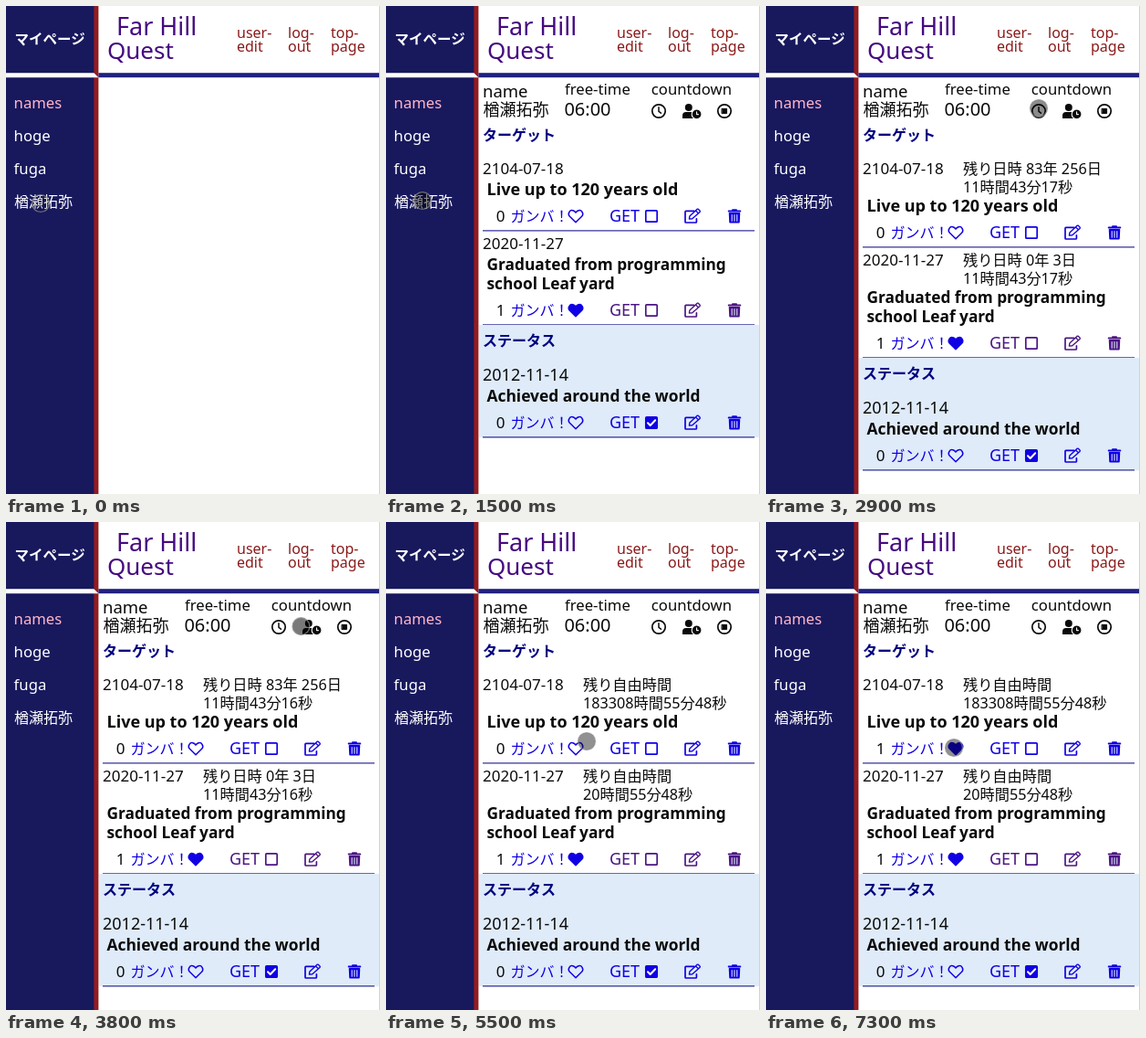
An HTML page for the animation above (7400 ms loop, 410 by 534 pixels).

```html
<!DOCTYPE html>
<html lang="ja">
<head>
<meta charset="utf-8">
<title>Goal list</title>
<style>
html, body { margin: 0; width: 100%; height: 100%; overflow: hidden; background: #fff; }
svg { display: block; width: 410px; height: 534px; }
text { font-family: "Noto Sans", "Noto Sans CJK JP", "Noto Sans CJK", sans-serif; white-space: pre; }
</style>
</head>
<body>
<svg id="stage" viewBox="0 0 410 534" xmlns="http://www.w3.org/2000/svg"></svg>
<script>
const LOOP = 7400, STEP = 100;
const SHOW_PAGE = 1300, SHOW_LEFT = 2700, TICK = 3700, SHOW_FREE = 4300, LIKE = 6400;
const BLUE = '#1000e4', PURPLE = '#4b1583', NAVY = '#000080', BLACK = '#0a0a0a', WINE = '#8b1a1a';
const PERSON = '楢瀬拓弥';
const stage = document.getElementById('stage');

const text = (x, y, size, fill, str, weight = 400) =>
  `<text x="${x}" y="${y}" font-size="${size}" fill="${fill}" font-weight="${weight}">${str}</text>`;
const rect = (x, y, w, h, fill) =>
  `<rect x="${x}" y="${y}" width="${w}" height="${h}" fill="${fill}"/>`;
const at = (x, y, color, body) =>
  `<g transform="translate(${x} ${y})" fill="none" stroke="${color}" stroke-width="1.7" stroke-linecap="round" stroke-linejoin="round">${body}</g>`;

const HEART = 'M0 6.8L-6.6 .3C-9.4-2.7-6.4-8-2.4-6C-1.2-5.4-.6-4.6 0-4C.6-4.6 1.2-5.4 2.4-6C6.4-8 9.4-2.7 6.6 .3Z';

function heart(x, y, full) {
  return at(x, y, BLUE, `<path d="${HEART}" fill="${full ? BLUE : 'none'}" stroke-width="1.5"/>`);
}

function box(x, y, color, checked) {
  const tick = checked ? '<path d="M-4 .2L-1.3 3L4.2-2.8" stroke="#fff" stroke-width="2"/>' : '';
  return at(x, y, color,
    `<rect x="-6.2" y="-6.2" width="12.4" height="12.4" rx="1" fill="${checked ? color : 'none'}"/>${tick}`);
}

function pencil(x, y, color) {
  return at(x, y, color,
    '<path d="M1.6-5.6H-7.2Q-8-5.6-8-4.8V6.2Q-8 7-7.2 7H3.6Q4.4 7 4.4 6.2V2.8"/>' +
    '<path d="M-3.6 3L-3.1 0L4.9-7.6Q5.7-8.2 6.5-7.6L8-6.1Q8.7-5.3 8-4.6L-.2 2.7ZM3.4-6.1L6.5-3.2" stroke-width="1.4"/>');
}

function trash(x, y, color) {
  return at(x, y, color,
    '<path d="M-6.3-5.6H6.3M-2-6.7H2" stroke-width="2"/>' +
    `<path d="M-5.4-3.2H5.4L4.9 6.7H-4.9Z" fill="${color}"/>` +
    '<path d="M-2.8-1.4V5.2M0-1.4V5.2M2.8-1.4V5.2" stroke="#dce2fa" stroke-width="1.1"/>');
}

function controls() {
  const clock = '<circle r="7.2"/><path d="M0-4.2V.4L2.4 2.2" stroke-width="1.5"/>';
  const user = `<g fill="${BLACK}" stroke="none"><circle cx="-3.2" cy="-4" r="4"/>` +
    '<path d="M-10 8V5Q-10 1-6 1H0Q3 1 4 3V8Z"/></g>' +
    `<circle cx="5.6" cy="3.4" r="5.4" fill="${BLACK}" stroke="#fff" stroke-width="1.1"/>` +
    '<path d="M5.6 .8V3.6H7.4" stroke="#fff" stroke-width="1.1"/>';
  const stop = `<circle r="7.2"/><rect x="-2.6" y="-2.6" width="5.2" height="5.2" fill="${BLACK}" stroke-width="1"/>`;
  return at(299, 115, BLACK, clock) + at(335, 115, BLACK, user) + at(371, 115, BLACK, stop);
}

function frameParts() {
  const nav = [['user-', 'edit', 253], ['log-', 'out', 309], ['top-', 'page', 356]];
  return rect(0, 0, 410, 534, '#fff') +
    rect(0, 0, 97, 534, '#18185d') + rect(96.4, 0, 5, 534, '#931c20') +
    '<path d="M0 73.2H96.4L101.4 78.2H0Z" fill="#fff"/>' +
    rect(101.4, 73.2, 307.6, 5, '#202080') + rect(409, 0, 1, 534, '#d2d2d2') +
    text(9.5, 42, 15.5, '#fff', 'マイページ', 700) +
    text(121, 32, 27, '#460b80', 'Far Hill') + text(111, 58, 26, '#460b80', 'Quest') +
    nav.map(([a, b, x]) => text(x, 35, 16, WINE, a) + text(x, 49.5, 16, WINE, b)).join('') +
    text(8.6, 112.2, 16.7, '#ffb6c8', 'names') + text(8.6, 148.2, 16.7, '#fff', 'hoge') +
    text(8.6, 184.2, 16.7, '#fff', 'fuga') + text(9, 220, 16, '#fff', PERSON);
}

function profile() {
  return text(106, 100, 18.5, BLACK, 'name') + text(106.5, 120, 18, BLACK, PERSON) +
    text(196, 97, 16.7, BLACK, 'free-time') + text(195.4, 120, 20, BLACK, '06:00') +
    text(290.8, 97, 16.7, BLACK, 'countdown') + controls() +
    text(106, 146.5, 16, NAVY, 'ターゲット', 700);
}

// One goal; y is the baseline of its date, gap the room for a second time line.
function goal(y, gap, g) {
  const last = y + 23 + gap + (g.lines.length - 1) * 21;
  const mid = last + 23, color = g.color;
  return text(106, y, g.done ? 18 : 17, BLACK, g.date) +
    (g.left || []).map((s, i) => text(216, y + i * 20, 16.2, BLACK, s)).join('') +
    g.lines.map((s, i) => text(110.5, y + 23 + gap + i * 21, g.size, BLACK, s, 700)).join('') +
    text(120.8, mid + 5.5, 17, BLACK, g.likes) + text(136.4, mid + 5.5, 16, BLUE, 'ガンバ！') +
    heart(208, mid, g.likes > 0) + text(245, mid + 5.7, 18, color, 'GET') +
    box(291, mid, color, g.done) + pencil(336, mid, color) + trash(382, mid, color) +
    rect(106, mid + 15.4, 298, 1, NAVY);
}

function timeLeft(t) {
  if (t < SHOW_LEFT) return [];
  if (t < SHOW_FREE) {
    const clock = `11時間43分${t < TICK ? 17 : 16}秒`;
    return [['残り日時 83年 256日', clock], ['残り日時 0年 3日', clock]];
  }
  return [['残り自由時間', '183308時間55分48秒'], ['残り自由時間', '20時間55分48秒']];
}

function page(t) {
  if (t < SHOW_PAGE) return '';
  const left = timeLeft(t), gap = left.length ? 18 : 0, low = 2 * gap;
  return profile() +
    goal(184, gap, { date: '2104-07-18', left: left[0], lines: ['Live up to 120 years old'],
      size: 18, likes: t < LIKE ? 0 : 1, color: BLUE }) +
    goal(266 + gap, gap, { date: '2020-11-27', left: left[1],
      lines: ['Graduated from programming', 'school Leaf yard'], size: 17.3, likes: 1, color: PURPLE }) +
    rect(102, 349 + low, 307, 123, '#dfebf9') +
    text(106, 372 + low, 16, NAVY, 'ステータス', 700) +
    goal(410 + low, 0, { date: '2012-11-14', lines: ['Achieved around the world'],
      size: 17.4, likes: 0, color: BLUE, done: true });
}

// time, x, y, opacity
const PATH = [
  [0, 38, 216, .1], [400, 40, 213, .25], [1000, 40, 213, .5], [1800, 40, 213, .45],
  [2500, 299, 112, .45], [3400, 299, 112, .45], [4000, 332, 115, .55], [4700, 332, 115, .5],
  [5500, 220, 240, .43], [5800, 206, 247, .43], [LOOP, 206, 247, .43]
];

function cursor(t) {
  const i = PATH.findIndex(p => p[0] > t);
  const a = PATH[i - 1], b = PATH[i];
  const k = (t - a[0]) / (b[0] - a[0]), e = k * k * (3 - 2 * k);
  const [x, y, o] = [1, 2, 3].map(n => a[n] + (b[n] - a[n]) * e);
  return `<circle cx="${x}" cy="${y}" r="9.4" fill="rgba(0,0,0,${o})" stroke="rgba(140,140,140,.75)" stroke-width="1.4"/>`;
}

const base = frameParts();
const start = performance.now();
let shown = -1;

function draw() {
  const t = Math.floor(((performance.now() - start) % LOOP) / STEP) * STEP;
  if (t !== shown) {
    shown = t;
    stage.innerHTML = base + page(t) + cursor(t);
  }
  requestAnimationFrame(draw);
}
draw();
</script>
</body>
</html>
```
